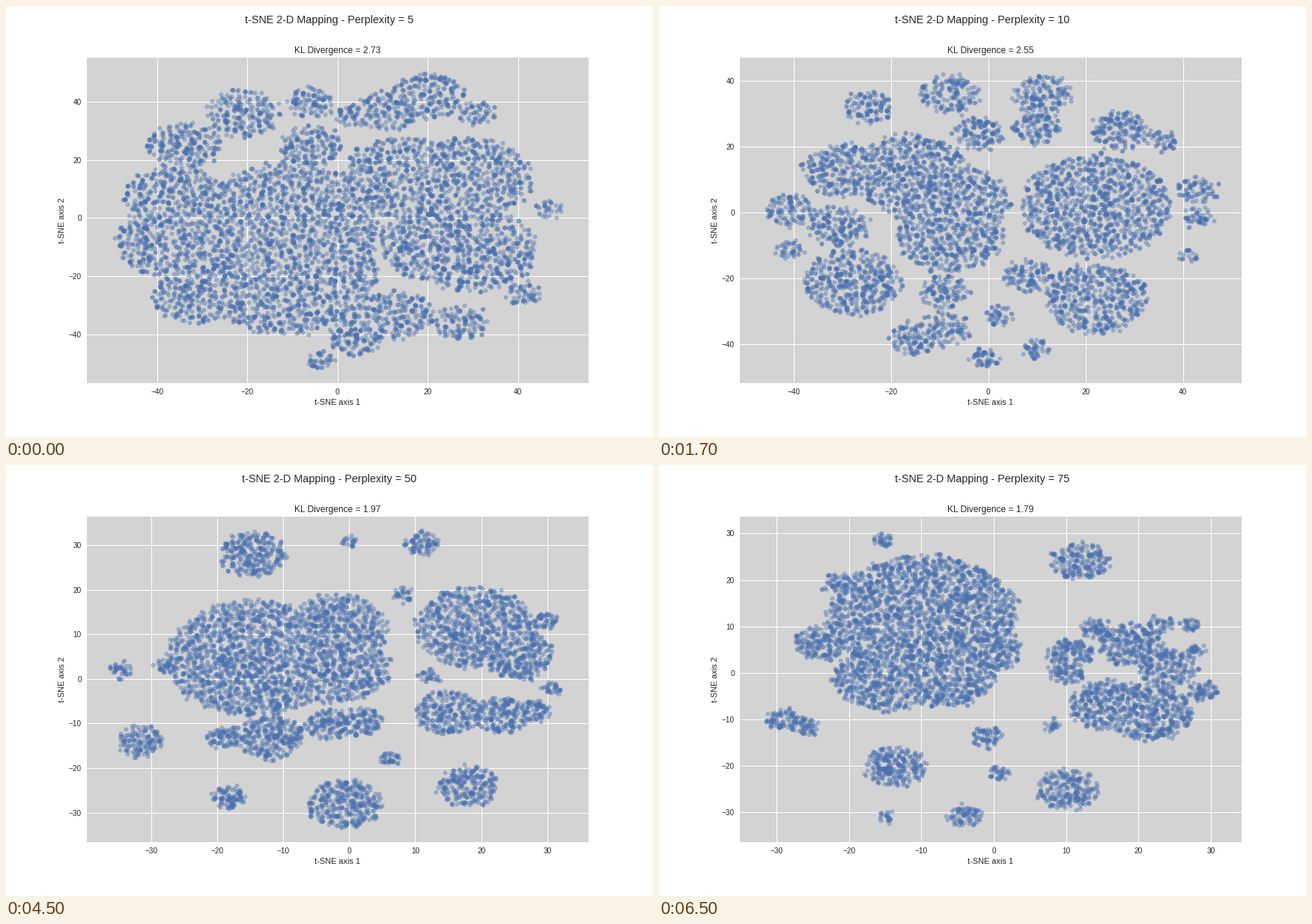
A matplotlib script for the animation above (8000 ms loop, 864 by 576 pixels).

```python
from itertools import chain

import numpy as np
import matplotlib.pyplot as plt
from matplotlib.animation import FuncAnimation
from matplotlib.ticker import MultipleLocator

WIDTH, HEIGHT, DPI = 864, 576, 72
INTERVAL, FRAMES = 500, 16
BLUE, INK = "#4C72B0", "0.15"
GOLDEN_ANGLE = np.pi * (3 - np.sqrt(5))

plt.rcParams.update({
    "font.family": "Liberation Sans", "text.color": INK,
    "axes.facecolor": "lightgrey", "axes.labelcolor": INK,
    "axes.labelsize": 11, "axes.titlesize": 12, "axes.axisbelow": True,
    "axes.grid": True, "grid.color": "white", "grid.linewidth": 1,
    "axes.linewidth": 0, "axes.edgecolor": "white",
    "xtick.color": INK, "ytick.color": INK,
    "xtick.labelsize": 10, "ytick.labelsize": 10,
    "xtick.major.size": 0, "ytick.major.size": 0,
    "xtick.major.pad": 7, "ytick.major.pad": 7,
})

# Each cluster is a disc in data units: x, y, radius.
# Overlapping discs join into one body.
STAGES = [
    dict(perplexity=5, divergence=2.73, step=20, density=0.6,
         xlim=(-55.55, 55.6), ylim=(-56.65, 55.05),
         bodies=[(-11, -1, 20), (-11, -20, 20), (-36, 7, 11), (-37, -8, 12),
                 (-31, -26, 10), (15, 14, 14), (29, 14, 14), (21, -9, 12),
                 (30, -11, 14)],
         islands=[(-34, 25, 8), (-21, 36, 8), (-6, 40, 5), (-6, 25, 7),
                  (3, 35, 4), (11, 37, 7), (20, 42, 8), (31, 36, 4),
                  (47, 3, 3), (41, -26, 4), (13, -33, 8), (4, -41, 6),
                  (27, -36, 6), (-4, -49, 3)]),
    dict(perplexity=10, divergence=2.55, step=20, density=0.8,
         xlim=(-51.1, 52), ylim=(-51.7, 47),
         bodies=[(-8, 3, 12), (-8, -7, 11), (-16, 12, 12), (-30, 13, 8),
                 (-31, -4, 6), (-28, -21, 10), (22, 2, 15.5),
                 (22, -26, 10.5), (8, -19, 5)],
         islands=[(-25, 32, 5), (-8, 36, 6), (-2, 24, 5), (11, 36, 6),
                  (10, 26, 5), (27, 25, 6), (36, 22, 3), (43, 7, 4),
                  (43, -1, 3), (41, -13, 2), (-41, 1, 5), (-41, -11, 3),
                  (-9, -24, 5), (-15, -38, 5), (-9, -35, 5), (2, -31, 3),
                  (-1, -44, 3), (10, -41, 3)]),
    dict(perplexity=20, divergence=2.33, step=20, density=1,
         xlim=(-47.46, 46.76), ylim=(-49.7, 47.5),
         bodies=[(6, -8, 16), (-14, -10, 7), (13, -17, 10),
                 (-20.5, 14.5, 13), (1, 27, 9), (-11, -26, 5),
                 (-3, -27, 6), (6, -30, 5)],
         islands=[(9, 41, 2), (14, 38, 2.5), (-12, 30, 4), (-1, 16, 4),
                  (-38, 4, 1.5), (-33, -10, 5), (-26, -12, 3), (17, 22, 4),
                  (25, 24, 3), (25, 18, 3), (37, 16.5, 2.5), (40, 2, 2),
                  (17, 9, 4), (28, 5, 5), (34, -8.5, 4), (-20, -22, 4),
                  (25, -16, 3), (31, -25, 2.5), (-8, -41, 4),
                  (-2, -41, 4)]),
    dict(perplexity=50, divergence=1.97, step=10, density=1.75,
         xlim=(-39.7, 36.2), ylim=(-36.6, 36.35),
         bodies=[(-14.5, 4.7, 13), (-2, 11, 7.8), (-2, 2.5, 7.8),
                 (19, 11.5, 9), (25.5, 5.5, 5.5), (15, -7.5, 5),
                 (23, -8, 4), (-12, -13, 5)],
         islands=[(-14.5, 28, 5), (0, 31, 1.2), (11, 30.5, 2.5),
                  (8, 19, 1.5), (-28, 3, 1.5), (-19, -13, 2.5),
                  (-3, -10, 3.5), (2, -9.5, 3), (-34.5, 2, 1.5),
                  (-31.5, -14, 3.5), (-18, -26.5, 2.5), (-0.6, -28, 5.5),
                  (6, -18, 1.5), (18, -24, 4.5), (29.5, 13, 2),
                  (28, -7, 2.5), (30.5, -2, 1.5), (12, 1, 1.5)]),
    dict(perplexity=75, divergence=1.79, step=10, density=2.1,
         xlim=(-35.07, 34.2), ylim=(-36.4, 33.6),
         bodies=[(-10, 12.3, 13), (-2, 14, 5.5), (-2, 5, 5.5), (-15, -1, 7),
                 (-7, 0, 7.3), (16, -7, 5.5), (21.5, -8.5, 6),
                 (10.5, 4, 3.2), (10, 0.5, 2.5), (19, 6, 4.5), (24, 1, 4)],
         islands=[(-15.4, 28.5, 1.3), (-21.5, 19.5, 2), (-24, 6.5, 3.5),
                  (12, 24, 3.8), (-29, -10, 2.3), (-26, -11.5, 1.8),
                  (-13.6, -20, 4.2), (-1, -13.6, 2), (0.8, -21.5, 1.5),
                  (-14.8, -31, 1), (-4, -30.7, 2.4), (10, -25, 4.2),
                  (8, -11.2, 1), (14, 9.5, 2), (23, 10.5, 1.7),
                  (27, 10.5, 1.3), (28, 5, 1.3), (29, -4, 2)]),
]


def fill_disc(center, radius, density, rng):
    """Even but irregular points, as complex numbers."""
    count = round(np.pi * (radius + 0.4) ** 2 * density)
    i = np.arange(count)
    spiral = np.sqrt((i + 0.5) / count) * np.exp(1j * GOLDEN_ANGLE * i)
    dx, dy = rng.normal(0, 0.35 / np.sqrt(density), (2, count))
    return center + radius * spiral + dx + 1j * dy


def make_cloud(stage):
    rng = np.random.default_rng(stage["perplexity"])
    points = np.array([], dtype=complex)
    filled = []
    for x, y, radius in chain(stage["bodies"], stage["islands"]):
        center = complex(x, y)
        fresh = fill_disc(center, radius, stage["density"], rng)
        for c, r in filled:
            fresh = fresh[abs(fresh - c) > r]
        filled.append((center, radius))
        points = np.append(points, fresh)
    # Similar samples land almost on top of each other.
    points = np.repeat(points, rng.geometric(0.5, len(points)))
    cloud = np.column_stack([points.real, points.imag])
    return rng.permutation(cloud + rng.normal(0, 0.15, cloud.shape))


clouds = [make_cloud(stage) for stage in STAGES]

fig = plt.figure(figsize=(WIDTH / DPI, HEIGHT / DPI), dpi=DPI,
                 facecolor="white")
ax = fig.add_axes([0.125, 0.125, 0.775, 0.755])
ax.set_xlabel("t-SNE axis 1")
ax.set_ylabel("t-SNE axis 2")
heading = fig.suptitle("", fontsize=14.4)
dots = ax.scatter([], [], s=20, c=BLUE, alpha=0.33, linewidths=1.75)


def update(frame):
    index = (frame + 3) // 4
    stage = STAGES[index]
    heading.set_text(f"t-SNE 2-D Mapping - Perplexity = {stage['perplexity']}")
    ax.set_title(f"KL Divergence = {stage['divergence']:.2f}")
    ax.set(xlim=stage["xlim"], ylim=stage["ylim"])
    for axis in (ax.xaxis, ax.yaxis):
        axis.set_major_locator(MultipleLocator(stage["step"]))
    dots.set_offsets(clouds[index])
    return heading, dots


anim = FuncAnimation(fig, update, frames=FRAMES, interval=INTERVAL,
                     repeat=True, repeat_delay=0, blit=False)
plt.show()
```
